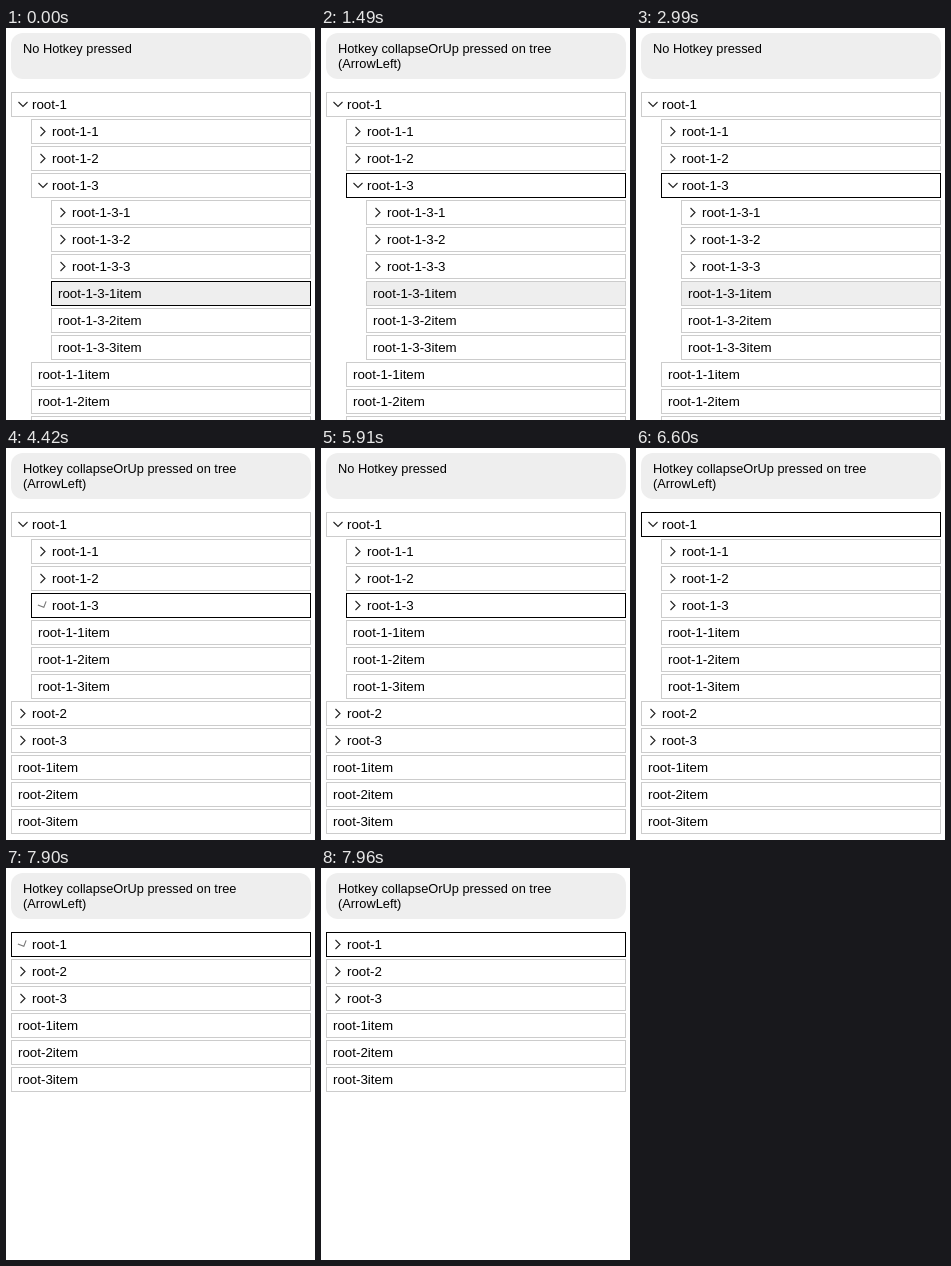
An HTML page for the animation above (8000 ms loop, 309 by 392 pixels).

```html
<!DOCTYPE html>
<html lang="en">
<head>
<meta charset="utf-8">
<title>Tree hotkeys</title>
<style>
  html, body { margin: 0; width: 100%; height: 100%; overflow: hidden; background: #fff; }
  svg { display: block; width: 309px; height: 392px; }
  text { font-family: "Liberation Sans", Arial, sans-serif; font-size: 13.333px; fill: #000; white-space: pre; }
  .status text { font-size: 12.8px; }
</style>
</head>
<body>
<svg viewBox="0 0 309 392">
  <g class="status">
    <rect x="5" y="5" width="300" height="46" rx="12" fill="#eee"/>
    <text id="line1" x="17" y="25"></text>
    <text id="line2" x="17" y="40"></text>
  </g>
  <g id="tree"></g>
</svg>
<script>
const LOOP = 8000, TOP = 64, PITCH = 27, INDENT = 20, RIGHT = 305;
const OPEN = 90, TURNING = 66, CLOSED = 0;
const SELECTED = 'root-1-3-1item';
const ns = 'http://www.w3.org/2000/svg';
const byId = id => document.getElementById(id);

// Each step changes only the listed parts of the state.
const steps = [
  { at: 0, pressed: false, focus: SELECTED, open: ['root-1', 'root-1-3'], turning: null },
  { at: 1490, pressed: true, focus: 'root-1-3' },
  { at: 2990, pressed: false },
  { at: 4420, pressed: true, open: ['root-1'], turning: 'root-1-3' },
  { at: 4480, turning: null },
  { at: 5910, pressed: false },
  { at: 6600, pressed: true, focus: 'root-1' },
  { at: 7900, open: [], turning: 'root-1' },
  { at: 7960, turning: null }
];

function stateAt(time) {
  return Object.assign({}, ...steps.filter(step => step.at <= time));
}

// Visible rows: three folders, then three items, on every level.
function listRows(parent, level, open) {
  const rows = [];
  for (const n of [1, 2, 3]) {
    const name = `${parent}-${n}`;
    rows.push({ name, level, folder: true });
    if (open.includes(name)) rows.push(...listRows(name, level + 1, open));
  }
  for (const n of [1, 2, 3]) rows.push({ name: `${parent}-${n}item`, level });
  return rows;
}

function add(parent, tag, attrs) {
  const node = document.createElementNS(ns, tag);
  for (const key in attrs) node.setAttribute(key, attrs[key]);
  return parent.appendChild(node);
}

function drawRow(row, index, state) {
  const tree = byId('tree');
  const x = 5 + row.level * INDENT, y = TOP + index * PITCH;
  add(tree, 'rect', {
    x: x + 0.5, y: y + 0.5, width: RIGHT - x - 1, height: 24,
    fill: row.name === SELECTED ? '#eee' : '#fff',
    stroke: row.name === state.focus ? '#000' : '#ccc'
  });
  if (row.folder) {
    const turning = row.name === state.turning;
    const angle = turning ? TURNING : state.open.includes(row.name) ? OPEN : CLOSED;
    add(tree, 'path', {
      d: 'M-2.5 -4.5 L2 0 L-2.5 4.5', fill: 'none',
      stroke: turning ? '#777' : '#222', 'stroke-width': 1.1,
      transform: `translate(${x + 12} ${y + 12.5}) rotate(${angle})`
    });
  }
  add(tree, 'text', { x: x + (row.folder ? 21 : 7), y: y + 17 }).textContent = row.name;
}

let shown = '';

function render(time) {
  const state = stateAt(time);
  const key = JSON.stringify(state);
  if (key === shown) return;
  shown = key;
  byId('line1').textContent = state.pressed ? 'Hotkey collapseOrUp pressed on tree' : 'No Hotkey pressed';
  byId('line2').textContent = state.pressed ? '(ArrowLeft)' : '';
  byId('tree').replaceChildren();
  listRows('root', 0, state.open).forEach((row, i) => {
    if (TOP + i * PITCH < 392) drawRow(row, i, state);
  });
}

const start = performance.now();
function tick() {
  render((performance.now() - start) % LOOP);
  requestAnimationFrame(tick);
}
tick();
</script>
</body>
</html>
```
